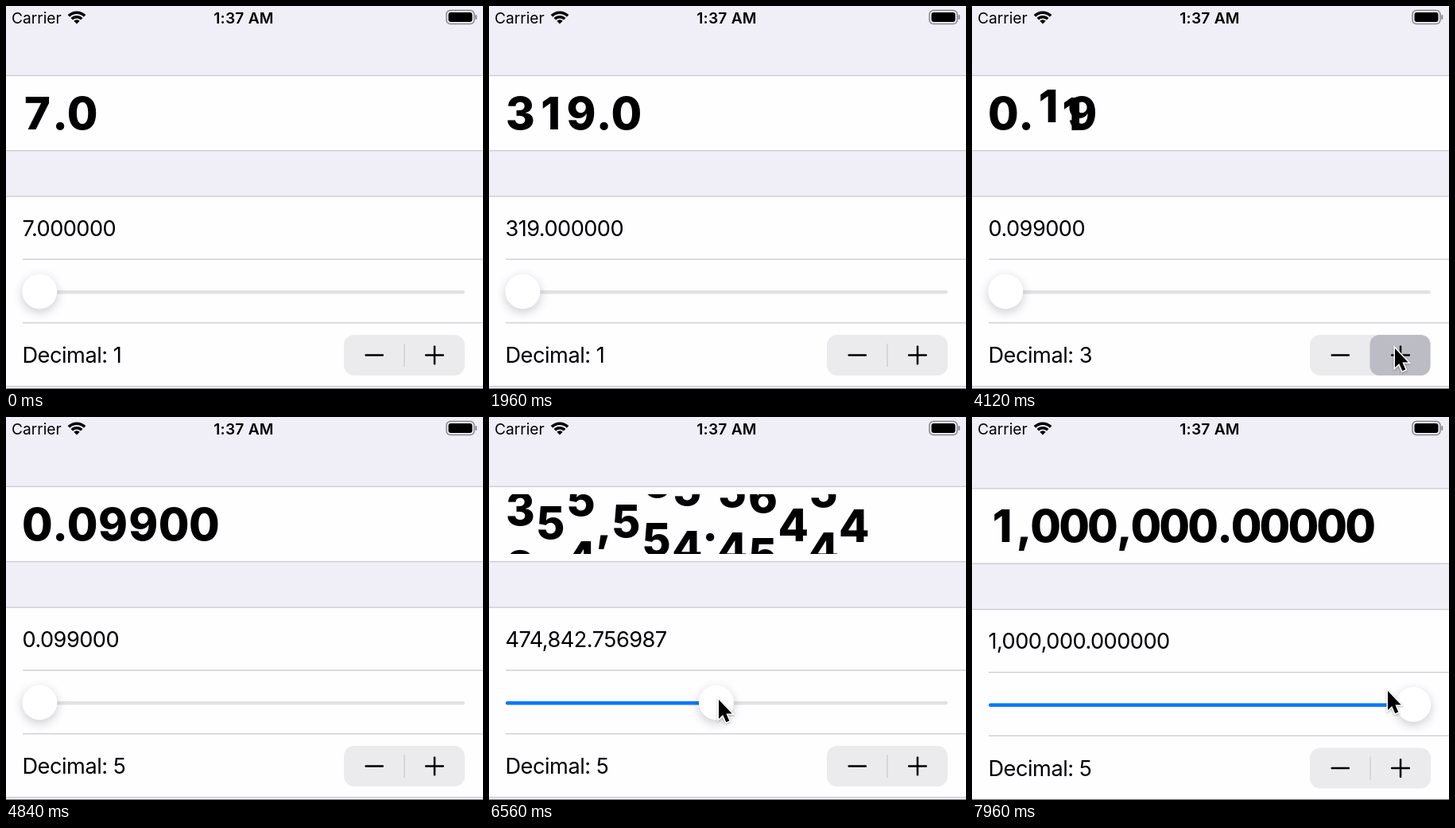
Animation, 600 px wide and 481 px high, one loop 8000 ms. Source, as an HTML page with a canvas:

```html
<!DOCTYPE html>
<html lang="en">
<head>
<meta charset="utf-8">
<title>Rolling number</title>
<style>
  html, body { margin: 0; width: 600px; height: 481px; overflow: hidden; }
  canvas { display: block; }
</style>
</head>
<body>
<canvas width="600" height="481"></canvas>
<script>
const ctx = document.querySelector('canvas').getContext('2d');
const LOOP = 8000, STEP = 40, ROLL = 200, LINE = 73, SEPARATOR = 18.5;
const DRAG_START = 6200, DRAG_END = 7040, MAX = 1e6;

// [time, value] of each jump, then of the slider drag
const jumps = [[-ROLL, 7], [312, 9], [792, 29], [1232, 36], [1752, 319], [2352, 608],
  [2792, 0], [3312, 0.099], [5352, 1234.567]];
const drag = [[DRAG_START, 1234.567], [6560, 474842.756987], [6960, 935534.596443], [7030, MAX]];
const clicks = [3982, 4078, 4360, 4640];
const pointer = [[3500, 522, 476], [3700, 522, 472], [3800, 531, 429], [5560, 112, 445],
  [5800, 50, 373], [6080, 42, 357], [DRAG_START, 42, 357], [6560, 288, 354], [6960, 576, 313],
  [DRAG_END, 576, 313], [7960, 522, 343]];

function tween(keys, t) {
  const next = keys.findIndex(key => key[0] > t);
  if (next === 0) return keys[0].slice(1);
  if (next < 0) return keys[keys.length - 1].slice(1);
  const a = keys[next - 1], b = keys[next], p = (t - a[0]) / (b[0] - a[0]);
  return a.slice(1).map((v, i) => v + (b[i + 1] - v) * p);
}

function ease(p) {
  p = Math.max(0, Math.min(1, p));
  return p * p * (3 - 2 * p);
}

const valueAt = t => t < DRAG_START ? jumps.filter(([time]) => time <= t).pop()[1] : tween(drag, t)[0];
const decimalsAt = t => 1 + clicks.filter(time => time <= t).length;
const format = (value, decimals) => value.toLocaleString('en-US',
  { minimumFractionDigits: decimals, maximumFractionDigits: decimals });

const changes = [...jumps.map(jump => jump[0]), ...clicks];
for (let t = DRAG_START; t <= DRAG_END; t += 20) changes.push(t);
changes.sort((a, b) => a - b);

// Each change adds its own eased offset, so overlapping changes blend.
function columnsAt(t) {
  let columns = new Map();
  for (const start of changes.filter(time => time <= t)) {
    const p = ease((t - start) / ROLL), value = valueAt(start);
    const string = format(value, decimalsAt(start)), dot = string.indexOf('.');
    const pitch = value < MAX ? 38.3 : 35.9;
    const next = new Map();
    let left = 22, previous = left;
    [...string].forEach((char, i) => {
      const isDigit = char >= '0' && char <= '9', key = i - dot;
      const toX = left + (isDigit ? pitch / 2 - 1.75 : 7.7), toDigit = isDigit ? +char : 0;
      const old = columns.get(key) || { x: key > 1 ? previous : toX, digit: toDigit, toDigit };
      const oldX = old.toX ?? old.x;
      next.set(key, {
        char, isDigit, toX, toDigit,
        x: old.x + (toX - oldX) * p,
        digit: old.digit + (toDigit - old.toDigit) * p
      });
      previous = toX;
      left += isDigit ? pitch : SEPARATOR;
    });
    columns = next;
  }
  return columns.values();
}

function rect(x, y, w, h, color, radius = 0) {
  ctx.fillStyle = color;
  ctx.beginPath();
  ctx.roundRect(x, y, w, h, radius);
  ctx.fill();
}

function text(string, x, y, font, spacing = 0, align = 'left') {
  ctx.font = font + ' Inter, sans-serif';
  ctx.letterSpacing = spacing + 'px';
  ctx.textAlign = align;
  ctx.fillStyle = '#000';
  ctx.fillText(string, x, y);
}

function drawStatusBar() {
  text('Carrier', 7, 21.5, '400 19.2px');
  text('1:37 AM', 299, 21.5, '600 19.2px', 0.2, 'center');
  ctx.strokeStyle = '#000';
  ctx.lineWidth = 3.6;
  for (const radius of [14.3, 8.8]) {
    ctx.beginPath();
    ctx.arc(89, 22.5, radius, -Math.PI * 0.75, -Math.PI * 0.25);
    ctx.stroke();
  }
  ctx.fillStyle = '#000';
  ctx.beginPath();
  ctx.moveTo(89, 22.5);
  ctx.arc(89, 22.5, 5.2, -Math.PI * 0.75, -Math.PI * 0.25);
  ctx.fill();
  ctx.strokeStyle = '#87868b';
  ctx.lineWidth = 1.5;
  ctx.beginPath();
  ctx.roundRect(554, 5.5, 35, 17, 5);
  ctx.stroke();
  rect(556.5, 8, 30, 12, '#000', 3);
  rect(590.3, 11, 2, 6, '#87868b', 1);
}

function drawNumber(t) {
  const glyph = (char, x, y) => text(char, x, y, '800 56px', 0, 'center');
  ctx.save();
  ctx.beginPath();
  ctx.rect(0, 97, 600, 75);
  ctx.clip();
  for (const { char, isDigit, x, digit } of columnsAt(t)) {
    if (!isDigit) glyph(char, x, 154.5);
    else for (const d of new Set([Math.floor(digit), Math.ceil(digit)]))
      glyph(d, x, 154.5 + (digit - d) * LINE);
  }
  ctx.restore();
}

function drawSlider(value) {
  const x = 42.3 + 513 * value / MAX;
  rect(21, 357, 556, 4.5, '#e2e1e5', 2.2);
  if (value > 2000) rect(21, 357, x - 21, 4.5, '#0a78fb', 2.2);
  ctx.save();
  ctx.shadowColor = 'rgba(0,0,0,0.2)';
  ctx.shadowBlur = 13;
  ctx.shadowOffsetY = 4;
  rect(x - 22, 336.5, 44, 44, '#fff', 22);
  ctx.restore();
}

function drawStepper(pressed) {
  rect(425, 413, 152, 51, '#ebeaec', 13);
  if (pressed) rect(500.5, 413, 76, 51, '#bcbcc4', 12);
  else rect(500.3, 424, 1.5, 29, '#d0cfd3');
  rect(451.5, 437.3, 23.5, 2.5, '#000', 1);
  rect(527, 437.3, 24, 2.5, '#000', 1);
  rect(537.8, 426.5, 2.5, 24, '#000', 1);
}

function drawPointer(t) {
  if (t < 3500 || t >= 4780 && t < 5560) return;
  ctx.save();
  ctx.translate(...tween(pointer, t < 4780 ? Math.min(t, 3800) : t));
  const arrow = new Path2D('M1 1V25L6.2 20L10.3 29.2L14.3 27.5L10.4 18.5H17.7Z');
  ctx.shadowColor = 'rgba(0,0,0,0.3)';
  ctx.shadowBlur = 3;
  ctx.shadowOffsetY = 1;
  ctx.strokeStyle = '#fff';
  ctx.lineWidth = 3;
  ctx.stroke(arrow);
  ctx.shadowColor = 'transparent';
  ctx.fillStyle = '#000';
  ctx.fill(arrow);
  ctx.restore();
}

function draw(t) {
  const value = valueAt(t);
  const line = (x, y) => rect(x, y, 600 - x, 1.2, '#cac9ce');

  rect(0, 0, 600, 481, '#f0eff8');
  drawStatusBar();

  ctx.save();
  ctx.translate(0, 2.5 * ease((t - 7700) / 200));
  rect(0, 87, 600, 94, '#fefdff');
  rect(0, 239, 600, 239, '#fefdff');
  for (const y of [86.7, 181, 238.5, 477]) line(0, y);
  for (const y of [317.6, 397.2]) line(21, y);
  drawNumber(t);
  text(format(value, 6), 20.5, 288.6, '400 27.2px', -0.55);
  drawSlider(value);
  text('Decimal: ' + decimalsAt(t), 20.5, 448, '400 27.2px', -0.5);
  drawStepper(clicks.some(time => t >= time && t < time + 130));
  ctx.restore();

  rect(0, 480, 600, 1, '#77767a');
  drawPointer(t);
}

function frame() {
  draw(Math.floor((performance.now() % LOOP + 0.5) / STEP) * STEP);
  requestAnimationFrame(frame);
}
frame();
</script>
</body>
</html>
```
